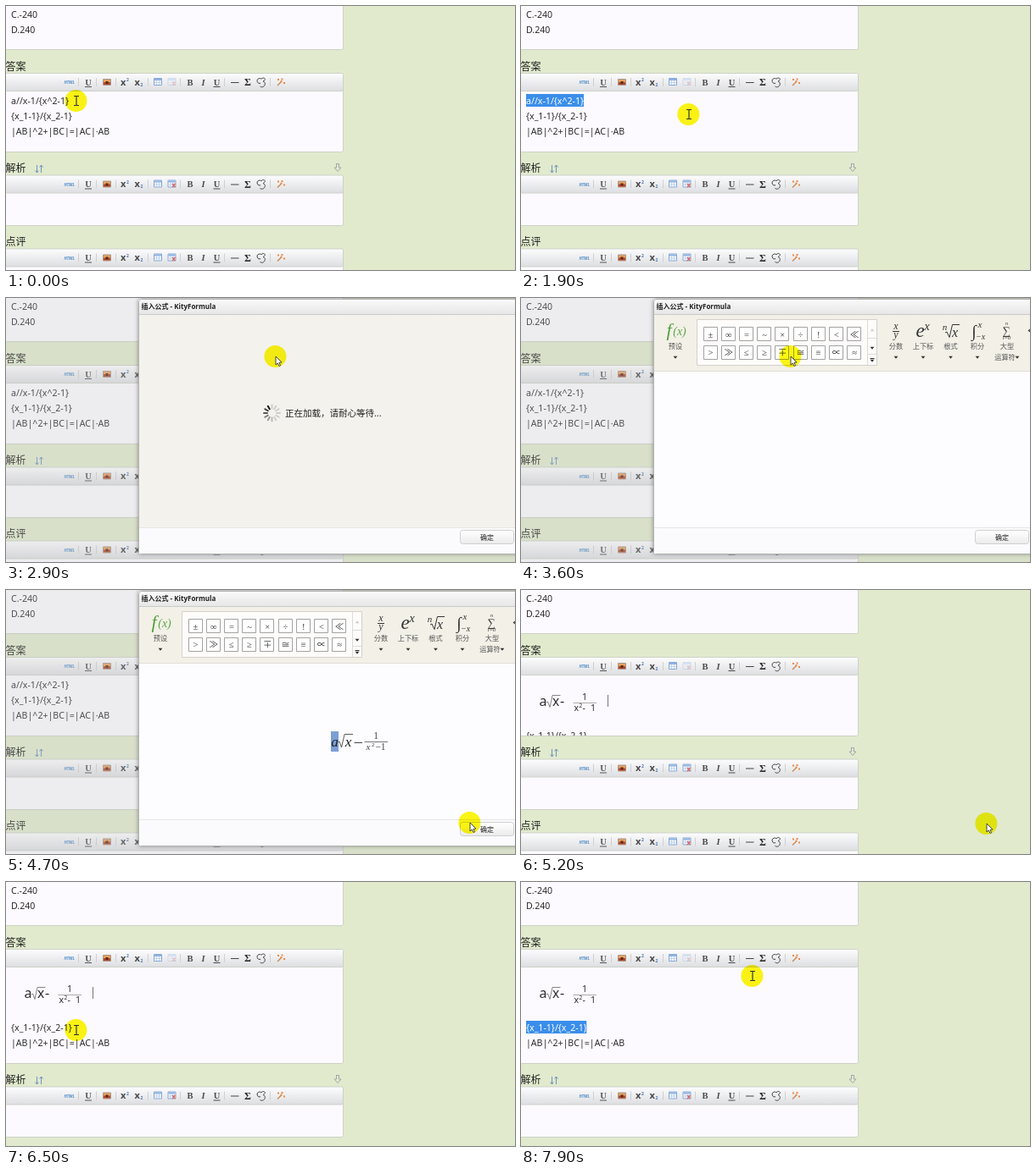
These frames come from a looping animation (600 px wide and 312 px high, 8 s). An HTML page with a canvas:

```html
<!DOCTYPE html>
<html lang="zh">
<meta charset="utf-8">
<title>Formula editor</title>
<style>
html, body { margin: 0; width: 100%; height: 100%; overflow: hidden; background: #e1eacd }
canvas { display: block }
</style>
<canvas id="stage" width="600" height="312"></canvas>
<script>
const c = document.getElementById('stage').getContext('2d');
const SANS = '"Noto Sans","Noto Sans CJK SC",sans-serif';
const SERIF = '"Liberation Serif","Noto Serif",serif';
const LOOP = 8000, OPEN = 2600, LOADED = 3200, READY = 3500, FORMULA = 3700, CLOSE = 5100, GROW = 5300;

// time, x, y of the pointer's hot spot
const path = [
  [0, 83, 112], [200, 83, 112], [400, 83, 118], [600, 79, 103], [700, 76, 108],
  [1000, 28, 110], [1100, 7, 108], [1200, -6, 107], [1300, -20, 107], [1600, -20, 142],
  [1700, 140, 142], [1900, 198, 128], [2200, 270, 96], [2500, 322, 85], [2900, 318, 69],
  [3600, 318, 69], [4000, 410, 145], [4300, 486, 208], [4600, 547, 275], [4800, 547, 275],
  [5200, 549, 276], [5400, 510, 262], [6100, 108, 178], [6400, 83, 175], [6500, 83, 175],
  [6700, 76, 175], [6900, 96, 175], [7100, 96, 175], [7200, 60, 173], [7300, 17, 172],
  [7400, 69, 171], [7600, 69, 171], [7900, 273, 111], [8000, 273, 111]
];

function pointerAt(t) {
  const i = Math.max(1, path.findIndex(p => p[0] >= t));
  const [a, b] = [path[i - 1], path[i]];
  const k = (t - a[0]) / (b[0] - a[0]);
  return [a[1] + (b[1] - a[1]) * k, a[2] + (b[2] - a[2]) * k];
}

function text(s, x, y, size, color = '#2c2c2c', { style = '', family = SANS, align = 'left' } = {}) {
  c.font = `${style} ${size}px ${family}`;
  c.fillStyle = color;
  c.textAlign = align;
  c.fillText(s, x, y);
}

const serif = (s, x, y, size, style = '', color = '#333') =>
  text(s, x, y, size, color, { style, family: SERIF, align: 'center' });
const mid = (s, x, y, size, color) => text(s, x, y, size, color, { align: 'center' });

function rect(x, y, w, h, fill, stroke, r = 0) {
  c.beginPath();
  c.roundRect(x, y, w, h, r);
  if (fill) { c.fillStyle = fill; c.fill(); }
  if (stroke) { c.lineWidth = 1; c.strokeStyle = stroke; c.stroke(); }
}

function line(points, color = '#333', width = 1) {
  c.beginPath();
  for (let i = 0; i < points.length; i += 2) c.lineTo(points[i], points[i + 1]);
  c.strokeStyle = color;
  c.lineWidth = width;
  c.stroke();
}

function fade(y0, y1, top, bottom) {
  const g = c.createLinearGradient(0, y0, 0, y1);
  g.addColorStop(0, top);
  g.addColorStop(1, bottom);
  return g;
}

function triangle(x, y, color = '#333', up = 1, r = 2.4) {
  c.beginPath();
  c.moveTo(x - r, y - up * r / 2);
  c.lineTo(x + r, y - up * r / 2);
  c.lineTo(x, y + up * r / 2 + up * .6);
  c.fillStyle = color;
  c.fill();
}

function tableIcon(x, y, remove) {
  rect(x - 4.5, y - 4.5, 9, 8, '#f4f8fd', '#86a9d6');
  rect(x - 4, y - 4, 8, 2, '#8fb3e0');
  line([x - 4, y + .5, x + 4, y + .5], '#b9cde8', .8);
  line([x - 1.5, y - 2, x - 1.5, y + 3], '#b9cde8', .8);
  line([x + 1.5, y - 2, x + 1.5, y + 3], '#b9cde8', .8);
  if (remove) line([x + .5, y - .5, x + 4, y + 3.5, x + 2.3, y + 1.5, x + 4, y - .5, x + .5, y + 3.5], '#d9605a', 1.2);
}

function toolbar(y, canRemove) {
  rect(-1.5, y - 10.5, 399, 21, fade(y - 10, y + 10, '#fcfcfd', '#dedfe2'), '#cdd1c9', 2);
  for (const x of [86, 107, 130, 168, 206, 258, 312]) line([x - .5, y - 5, x - .5, y + 5], '#cfd0d3');
  text('HTML', 68.5, y + 2, 4.7, '#4f8cca', { style: 'italic bold' });
  serif('U', 97, y + 3.5, 10.5, 'bold', '#555');
  line([93, y + 5.5, 101, y + 5.5], '#555');

  rect(114.5, y - 3.5, 9, 7, '#e9a05c', '#a59a92');
  rect(115, y, 8, 3, '#b5482a');
  rect(117.5, y - 1, 3, 3, '#5a2a1c');

  for (const [x, dy] of [[139.5, -1], [156, 4.5]]) {
    text('x', x - 4.5, y + 3.5, 11, '#4a4a4a', { style: 'bold' });
    text('2', x + 2.5, y + dy, 5, '#4a76b4', { style: 'bold' });
  }
  tableIcon(179, y);
  c.globalAlpha = canRemove ? 1 : .3;
  tableIcon(195.5, y, true);
  c.globalAlpha = 1;

  serif('B', 217, y + 3.5, 10.5, 'bold', '#4a4a4a');
  serif('I', 232.5, y + 3.5, 10.5, 'italic bold', '#4a4a4a');
  serif('U', 248.5, y + 3.5, 10.5, 'bold', '#4a4a4a');
  line([244.5, y + 5.5, 252.5, y + 5.5], '#4a4a4a');
  line([265, y + .5, 274.5, y + .5], '#444');
  serif('Σ', 285, y + 4, 12, 'bold', '#2c2c2c');

  c.beginPath();
  c.arc(299, y - 1.5, 3, 1.2, 5.4);
  c.bezierCurveTo(304, y - 7, 308, y - 3, 303, y - 1);
  c.bezierCurveTo(308, y + 1, 304, y + 8, 299.5, y + 5);
  c.strokeStyle = '#444';
  c.lineWidth = 1;
  c.stroke();

  line([320, y + 4, 325, y - 1], '#c98a55', 1.5);
  for (const [x, dy] of [[321, -3], [325.5, -3.5], [328, 1], [324.5, -1]]) rect(x - 1, y + dy - 1, 2, 2, '#ee8a4a');
}

function section(label, y, bottom, canRemove) {
  text(label, -.5, y + 4, 12, '#222');
  rect(-1.5, y + 10, 399, bottom - y - 10, '#fcfafe', '#ccd1c6', 2);
  toolbar(y + 18.5, canRemove);
}

function sortArrows(y) {
  const color = '#6f93bd';
  line([36.5, y - 4, 36.5, y + 5], color);
  line([34.5, y + 2.5, 36.5, y + 5, 38.5, y + 2.5], color);
  line([41.5, y + 5, 41.5, y - 4], color);
  line([39.5, y - 1.5, 41.5, y - 4, 43.5, y - 1.5], color);
  line([389.5, y - 5.5, 392.5, y - 5.5, 392.5, y - 1, 395, y - 1, 391, y + 3.5, 387, y - 1, 389.5, y - 1, 389.5, y - 6], '#98a0a6', .9);
}

// A text line, white on blue from x = from to x = to
function bodyLine(s, y, from, to) {
  text(s, 6, y, 10.6);
  if (from === undefined) return;
  c.save();
  c.beginPath();
  c.rect(from, y - 12, to - from, 15);
  c.clip();
  rect(from, y - 12, to - from, 15, '#3a8eea');
  text(s, 6, y, 10.6, '#fff');
  c.restore();
}

function insertedFormula(caret) {
  text('a', 21.5, 137, 16);
  line([30, 133, 31.5, 132, 34, 138.5, 37, 124.5, 46.5, 124.5], '#666', .8);
  text('x', 37, 137, 15.5);
  text('-', 46, 137, 16);
  mid('1', 75, 130, 10.5);
  line([61.5, 133.5, 89, 133.5], '#aaa');
  text('x', 62.5, 143, 10.5);
  text('2', 68.5, 139, 6.5);
  text('-', 72.5, 143, 10.5);
  text('1', 82, 143, 10.5);
  if (caret) line([102.5, 124, 102.5, 138], '#777');
}

function page(t, x) {
  const inserted = t >= CLOSE, dy = t >= GROW ? 42 : 0;
  rect(0, 0, 600, 312, '#e1eacd');
  rect(-1.5, -4, 399, 55.5, '#fcfafe', '#ccd1c6', 2);
  text('C.-240', 6, 14, 10.6);
  text('D.240', 6, 32, 10.6);
  section('答案', 71.5, 172.5 + dy, false);

  c.save();
  c.beginPath();
  c.rect(0, 101, 397, 71 + dy);
  c.clip();
  const shift = inserted ? 42 : 0;
  if (inserted) insertedFormula(t < 5700 || t >= 6200 && t < 6800);
  else {
    const selecting = t >= 700 && t < OPEN;
    bodyLine('a//x-1/{x^2-1}', 116, selecting ? t < 1200 ? Math.min(74, Math.max(6, x)) : 6 : undefined, 74);
  }
  bodyLine('{x_1-1}/{x_2-1}', 134 + shift, t < 7200 ? undefined : t < 7300 ? x : 6, 77.5);
  bodyLine('|AB|^2+|BC|=|AC|·AB', 152 + shift);
  c.restore();

  section('解析', 192 + dy, 259.5 + dy, true);
  sortArrows(192 + dy);
  section('点评', 279 + dy, 346 + dy, true);
}

function spinner(t) {
  const head = Math.round((t - 2900) / 100) + 11;
  c.lineCap = 'round';
  for (let i = 0; i < 12; i++) {
    const a = i * Math.PI / 6 - Math.PI / 2, lag = (head - i + 24) % 12;
    const shade = Math.min(205, 25 + lag * 32), [s, k] = [Math.sin(a), Math.cos(a)];
    line([313.5 + 5.5 * k, 136 + 5.5 * s, 313.5 + 9.5 * k, 136 + 9.5 * s], `rgb(${shade},${shade},${shade})`, 2);
  }
  c.lineCap = 'butt';
  text('正在加载，请耐心等待...', 329, 140, 10.5, '#222');
}

function formulaBar() {
  rect(157, 20, 443, 66, '#f2f0e7');
  line([157, 86.5, 600, 86.5], '#e0ded8');
  serif('f', 174.5, 45, 22, 'italic', '#4f9e3c');
  serif('(x)', 187, 44, 14, 'italic', '#5aa845');

  rect(207.5, 25.5, 212, 54, '#fdfcfb', '#d3d1ca');
  line([408.5, 26, 408.5, 79], '#dddbd4');
  line([409, 47.5, 419, 47.5], '#dddbd4');
  line([409, 66.5, 419, 66.5], '#dddbd4');
  triangle(414, 38, '#ccc', -1);
  triangle(414, 59);
  triangle(414, 74);
  line([411.5, 71.5, 416.5, 71.5]);
  ['±∞=~×÷!<≪', '>≫≤≥∓≅≡∝≈'].forEach((row, j) => [...row].forEach((s, i) => {
    const x = 223.5 + i * 21.2, y = 43 + j * 21.5;
    rect(Math.round(x - 8) - .5, Math.round(y - 8) - .5, 16, 16, '#fff', '#a2a2a2');
    serif(s, x, y + 3.5, 10.5, '', '#333');
  }));

  serif('x', 442, 37, 12, 'italic');
  line([438, 39.5, 446, 39.5]);
  serif('y', 442, 47, 12, 'italic');
  serif('e', 470.5, 46, 23, 'italic');
  serif('x', 478.5, 38, 14, 'italic');
  serif('n', 499.5, 38, 11, 'italic');
  line([500, 41, 502, 40, 505, 46.5, 508.5, 31.5, 517, 31.5], '#333', 1);
  serif('x', 511.5, 46, 16, 'italic');
  serif('∫', 534, 45.5, 20);
  serif('x', 541, 35, 11, 'italic');
  serif('−x', 541.5, 48.5, 10, 'italic');
  serif('∑', 572.5, 43, 13);
  serif('n', 572.5, 32, 6, 'italic');
  serif('i=0', 572.5, 48.5, 6.5, 'italic');
  // edge of the next button
  line([601, 36.5, 598.5, 38.5, 601, 40.5], '#333', 1.2);

  [['预设', 182], ['分数', 442], ['上下标', 474], ['根式', 506.5], ['积分', 538], ['大型', 573]].forEach(([s, x]) => {
    mid(s, x, 60, 8.2, '#555');
    if (x < 573) triangle(x, 70);
  });
  mid('运算符', 570.5, 73, 8.2, '#555');
  triangle(585, 70);
}

function editedFormula() {
  rect(383, 167, 9, 24, '#7b9fd3');
  serif('a', 387.5, 185, 17, 'italic', '#222');
  line([391.5, 180, 393, 179, 395.5, 186, 399, 170.5, 409, 170.5], '#333', .8);
  serif('x', 403.5, 185, 17, 'italic', '#222');
  line([410.5, 180.5, 420, 180.5], '#333', .9);
  serif('1', 436, 176, 11.5, '', '#444');
  line([422.5, 179.5, 450, 179.5], '#555', .8);
  serif('x', 427, 188.5, 11, 'italic', '#444');
  serif('2', 432.5, 184.5, 7, '', '#444');
  serif('−1', 441.5, 188.5, 11.5, '', '#444');
}

function dialog(t) {
  rect(0, 0, 600, 312, 'rgba(190,190,190,.25)');
  c.save();
  c.shadowColor = 'rgba(0,0,0,.4)';
  c.shadowBlur = 5;
  rect(156, 1, 460, 301.5, '#fbfafc', null, 3);
  c.restore();
  rect(156.5, 1.5, 460, 301, fade(1, 20, '#fafafa', '#e6e6e6'), '#b4b4b4', 3);
  text('插入公式 - KityFormula', 159.5, 13, 8, '#222', { style: 'bold' });
  line([157, 19.5, 600, 19.5], '#cacaca');
  rect(157, 20, 443, 282, '#fbfafc');
  if (t < LOADED) {
    rect(157, 20, 443, 251, '#f3f2ec');
    spinner(t);
  } else {
    rect(157, 20, 443, 251, '#fdfcfe');
    formulaBar();
    if (t < READY) rect(157, 20, 443, 66, 'rgba(242,240,231,.5)');
    if (t >= FORMULA) editedFormula();
  }
  line([157, 271.5, 600, 271.5], '#e6e5e6');
  rect(535.5, 274.5, 63, 16, fade(275, 290, '#ffffff', '#ececec'), '#cfcfcf', 3);
  mid('确定', 567, 285.5, 8, '#222');
}

function pointer(x, y, beam) {
  c.globalCompositeOperation = 'multiply';
  c.beginPath();
  c.arc(x - .6, y, 13, 0, 7);
  c.fillStyle = '#fdf714';
  c.fill();
  c.globalCompositeOperation = 'source-over';
  if (beam) {
    line([x - 3, y - 5.5, x + 3, y - 5.5], '#333');
    line([x, y - 5.5, x, y + 5.5], '#333', 1.2);
    line([x - 3, y + 5.5, x + 3, y + 5.5], '#333');
    return;
  }
  c.beginPath();
  for (const [dx, dy] of [[0, 0], [0, 10], [2.3, 8], [4, 11.5], [5.6, 10.8], [4, 7.4], [7, 7]]) c.lineTo(x + dx, y + dy);
  c.closePath();
  c.fillStyle = '#fff';
  c.fill();
  c.strokeStyle = '#333';
  c.lineWidth = .9;
  c.stroke();
}

function draw(now) {
  const t = Math.floor(now % LOOP / 100) * 100;
  const [x, y] = pointerAt(t), open = t >= OPEN && t < CLOSE;
  page(t, x);
  if (open) dialog(t);
  pointer(x, y, !open && x < 397 && y > 101 && y < (t >= GROW ? 214 : 172));
  requestAnimationFrame(draw);
}
requestAnimationFrame(draw);
</script>
</html>
```
